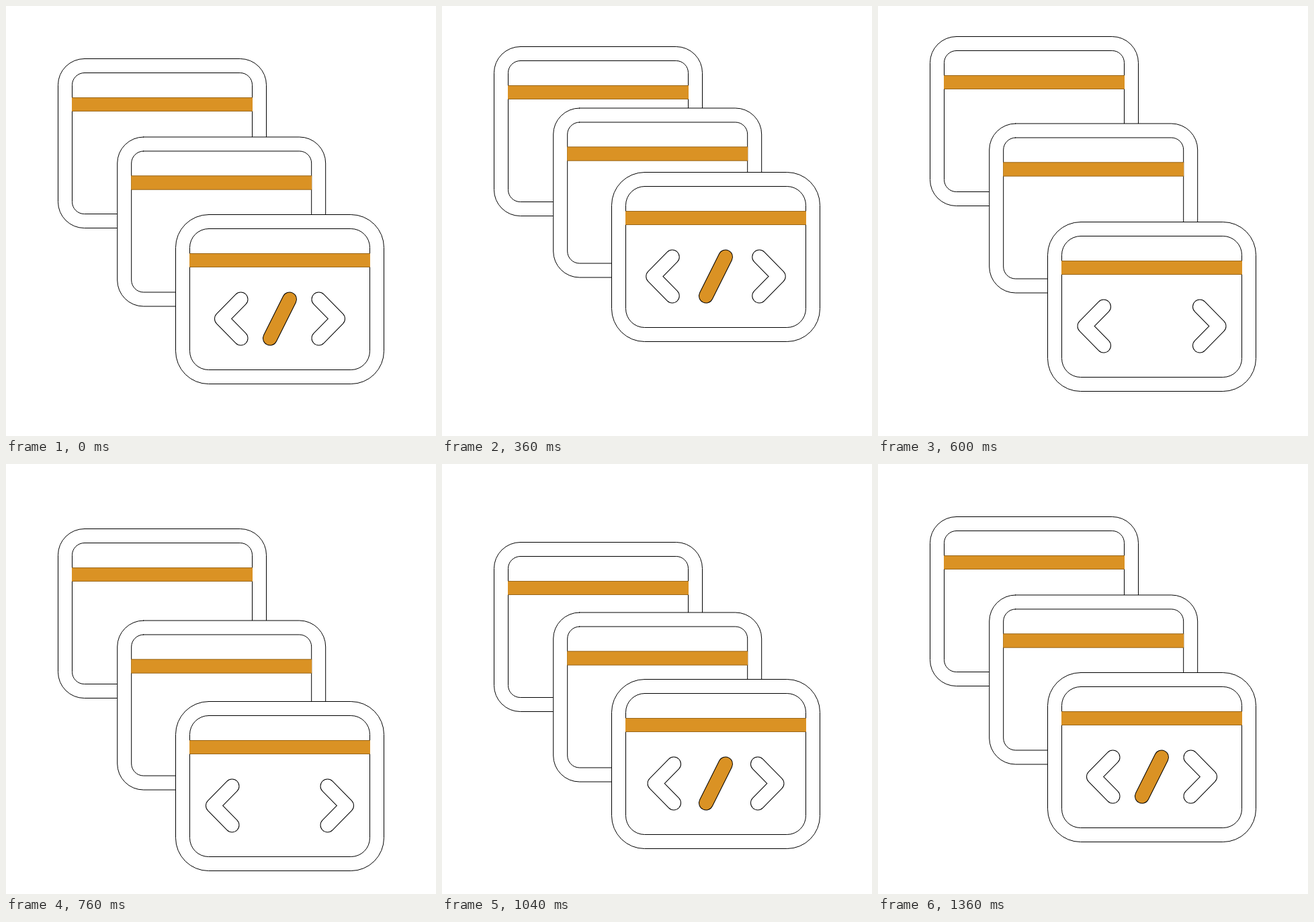
An HTML page with a canvas for the animation above (1400 ms loop, 640 px wide and 640 px high).

```html
<!DOCTYPE html>
<html lang="en">
<head>
<meta charset="utf-8">
<title>Stacked code windows</title>
<style>
  html, body { margin: 0; width: 100%; height: 100%; overflow: hidden; background: #fff; }
  canvas { display: block; width: 640px; height: 640px; }
</style>
</head>
<body>
<canvas id="stage" width="640" height="640"></canvas>
<script>
const ctx = document.getElementById('stage').getContext('2d');
const LOOP = 1400, STEP = 40;
const ORANGE = '#da9224', EDGE = '#7d5313';

// Each path is a list of [time in ms, value] keys.
const windows = [
  { x: 77.5, y: 78.5, r: 39,
    path: [[208, 0], [512, -37], [553, -37], [902, 49], [1350, 0]] },
  { x: 165.7, y: 195, r: 39,
    path: [[145, 0], [450, -55], [826, 46], [1295, 0]] },
  { x: 252.5, y: 310.5, r: 49,
    path: [[40, 0], [340, -64], [750, 43.5], [1176, 0]] }
];
const spreadPath = [[132, 0], [588, 13.5], [697, 13.5], [1255, 0]];
const slashPath = [[370, 1], [570, 0], [770, 0], [980, 1]];

const ease = u => u * u * (3 - 2 * u);

function valueAt(path, t) {
  const next = path.findIndex(key => key[0] > t);
  if (next === 0) return path[0][1];
  if (next < 0) return path[path.length - 1][1];
  const [t0, a] = path[next - 1], [t1, b] = path[next];
  return a + (b - a) * ease((t - t0) / (t1 - t0));
}

function roundRect(x, y, w, h, r) {
  ctx.beginPath();
  ctx.roundRect(x, y, w, h, r);
  ctx.fill();
  ctx.stroke();
}

function drawWindow(x, y, r) {
  ctx.fillStyle = '#fff';
  ctx.strokeStyle = '#000';
  ctx.lineWidth = 1;
  roundRect(x, y, 310, 252, r);
  roundRect(x + 21, y + 21, 268, 210, r - 21);

  ctx.fillStyle = ORANGE;
  ctx.fillRect(x + 20.5, y + 57.5, 269, 21);
  ctx.fillStyle = EDGE;
  ctx.fillRect(x + 20.5, y + 57.5, 269, 0.7);
  ctx.fillRect(x + 20.5, y + 77.8, 269, 0.7);
}

// A thick rounded line with a hairline outline.
function tube(points, color) {
  ctx.lineCap = ctx.lineJoin = 'round';
  ctx.beginPath();
  points.forEach(([x, y]) => ctx.lineTo(x, y));
  for (const [width, style] of [[22, '#000'], [20, color]]) {
    ctx.lineWidth = width;
    ctx.strokeStyle = style;
    ctx.stroke();
  }
}

function drawCode(x, y, spread, slash) {
  const cx = x + 155, cy = y + 155;
  for (const side of [-1, 1]) {
    const end = cx + side * (58 + spread), tip = end + side * 28.5;
    tube([[end, cy - 29], [tip, cy], [end, cy + 29]], '#fff');
  }
  if (slash < 0.01) return;
  ctx.save();
  ctx.translate(cx, cy);
  ctx.scale(slash, slash);
  tube([[14.5, -29], [-14.5, 29]], ORANGE);
  ctx.restore();
}

function draw(now) {
  const t = Math.floor((now % LOOP) / STEP) * STEP;
  ctx.fillStyle = '#fff';
  ctx.fillRect(0, 0, 640, 640);
  let x, y;
  for (const win of windows) {
    x = win.x;
    y = win.y + Math.round(valueAt(win.path, t));
    drawWindow(x, y, win.r);
  }
  drawCode(x, y, valueAt(spreadPath, t), valueAt(slashPath, t));
  requestAnimationFrame(() => draw(performance.now()));
}

draw(performance.now());
</script>
</body>
</html>
```
